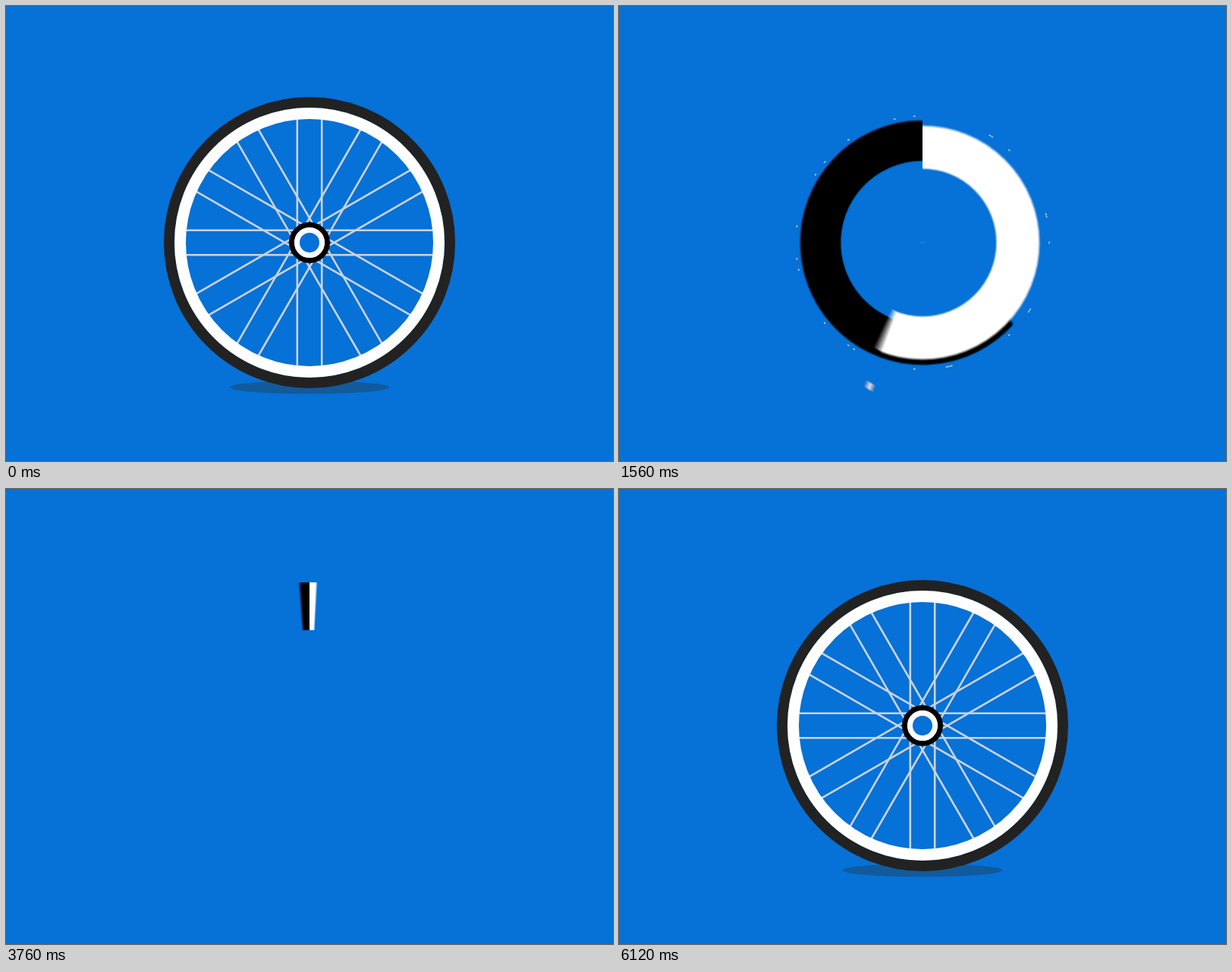
Write an HTML page with a canvas that moves like this. It is 800 px wide and 600 px high and loops after 6.16 s.

```html
<!DOCTYPE html>
<html lang="en">
<head>
<meta charset="utf-8">
<title>Wheel and chart</title>
<style>
  html, body { margin: 0; width: 100%; height: 100%; overflow: hidden; background: #0671d6; }
  canvas { display: block; width: 800px; height: 600px; }
</style>
</head>
<body>
<canvas id="stage" width="800" height="600"></canvas>
<script>
const LOOP = 6160, STEP = 40, SHUTTER = 20, SAMPLES = 12;
const CX = 400, CY = 312, TAU = Math.PI * 2, SHARE = 0.42;
const BLUE = '#0671d6', TIRE = '#222', SPOKE = '#ccd3dc', TICK = '#fddfdb';

const view = document.getElementById('stage').getContext('2d');
const layer = document.createElement('canvas');
layer.width = 800;
layer.height = 600;
const c = layer.getContext('2d');

const rad = deg => deg * Math.PI / 180;
const mix = (a, b, p) => a + (b - a) * p;
const part = (t, from, to) => Math.min(1, Math.max(0, (t - from) / (to - from)));
const out = (t, from, to) => 1 - (1 - part(t, from, to)) ** 3;
const inOut = (t, from, to) => {
  const u = part(t, from, to);
  return u < 0.5 ? 4 * u ** 3 : 1 - 4 * (1 - u) ** 3;
};

// Ring sector; angles are turns clockwise from the top.
function ring(outer, inner, color, from = 0, to = 1) {
  if (outer - inner < 0.05 || to - from < 0.0001) return;
  c.strokeStyle = color;
  c.lineWidth = outer - inner;
  c.beginPath();
  c.arc(0, 0, (outer + inner) / 2, (from - 0.25) * TAU, (to - 0.25) * TAU);
  c.stroke();
}

function shadow(scale) {
  if (scale < 0.005) return;
  c.fillStyle = '#115a9c';
  c.beginPath();
  c.ellipse(0, 190.8, 105 * scale, 8.7 * scale, 0, 0, TAU);
  c.fill();
}

// Twelve spokes fanned from a base angle, set off to one side of the hub.
function fan(base, gap, side, near, far) {
  if (far - near < 0.5) return;
  c.strokeStyle = SPOKE;
  c.lineWidth = 2.6;
  for (let k = 0; k < 12; k++) {
    c.save();
    c.rotate(rad(base - gap * k));
    c.beginPath();
    c.moveTo(near, side * 16.2);
    c.lineTo(far, side * 16.2);
    c.stroke();
    c.restore();
  }
}

function tick(deg, near, far) {
  if (far - near < 0.3) return;
  c.save();
  c.rotate(rad(deg));
  c.fillStyle = TICK;
  c.fillRect(-3.7, -far, 7.4, far - near);
  c.restore();
}

function label(scale, count) {
  if (scale < 0.01) return;
  c.save();
  c.scale(scale, scale);
  c.fillStyle = '#fff';
  c.textAlign = 'center';
  c.font = '800 68px Inter, Lato, sans-serif';
  c.fillText(Math.round(count), -32.5, 23.5);
  c.font = '600 68px Inter, Lato, sans-serif';
  c.fillText('%', 44, 23.5);
  c.restore();
}

function wheelToChart(t) {
  shadow(1 - inOut(t, 480, 1040) + inOut(t, 1500, 2040));

  const p = inOut(t, 484, 1724);
  const near = mix(-4, 167, p);
  fan(90 - 19 * p, 30 + 15 * p, 1, near, 167);
  fan(270 - 30.5 * p, 30 + 17 * p, -1, near, 167);

  const rim = mix(178, 191.5, inOut(t, 454, 1300));
  const edge = mix(192, 191.5, inOut(t, 454, 1300));
  if (t < 1300) {
    ring(edge, rim, TIRE);
    ring(rim, mix(163, 191.5, inOut(t, 750, 1300)), '#fff');
  }

  const grow = inOut(t, 484, 2140);
  ring(mix(27, 189, grow), mix(20, 126, grow), '#000', SHARE * inOut(t, 312, 2140), 1);
  ring(mix(20, 189, inOut(t, 583, 2140)), mix(13, 126, inOut(t, 685, 2140)), '#fff',
    0, mix(1, SHARE, inOut(t, 672, 2140)));

  const orbit = inOut(t, 900, 1900);
  const size = 4.5 * part(t, 1000, 1060) * (1 - part(t, 1700, 1900));
  const r = mix(48, 217, inOut(t, 700, 1900));
  tick(mix(271, 187, orbit), r - size, r + size);

  label(out(t, 1560, 2040), 100 * SHARE * out(t, 1560, 2160));
}

function chartAway(t) {
  const left = 1 - inOut(t, 2770, 3960);
  shadow(1 - inOut(t, 3200, 3720));
  ring(189, 126, '#000', 1 - (1 - SHARE) * left, 1);
  ring(189, 126, '#fff', 0, SHARE * left);
  label(1 - inOut(t, 2800, 3360), 100 * SHARE);
}

function wheelIn(t) {
  shadow(inOut(t, 4480, 4810));

  const rest = 1 - out(t, 4863, 6120);
  const far = mix(0, 167, out(t, 4863, 5655));
  if (t > 4863) {
    fan(90 - 18.6 * rest, 30 - 15 * rest, 1, -4, far);
    fan(270 - 19.8 * rest, 30 - 12.7 * rest, -1, -4, far);
  }

  ring(192 * out(t, 4320, 4848), 178 * out(t, 4350, 4950), TIRE);
  ring(178 * out(t, 4590, 5210), 163 * out(t, 4650, 5410), '#fff');
  ring(27, 20, '#000', 0, inOut(t, 4960, 5610));
  ring(20, 13, '#fff', 0, inOut(t, 5240, 5840));

  const tip = mix(196, 277, out(t, 4960, 5240));
  const tail = mix(196, 277, out(t, 5130, 5440));
  for (let k = 0; k < 9; k++) tick(40 * k, tail, tip);
}

function scene(t) {
  c.setTransform(1, 0, 0, 1, 0, 0);
  c.fillStyle = BLUE;
  c.fillRect(0, 0, 800, 600);
  c.translate(CX, CY);
  if (t < 2400) wheelToChart(t);
  else if (t < 4200) chartAway(t);
  else wheelIn(t);
}

// Average several moments of the open shutter for motion blur.
function render(t) {
  for (let i = 0; i < SAMPLES; i++) {
    scene(t + SHUTTER * ((i + 0.5) / SAMPLES - 0.5));
    view.globalAlpha = 1 / (i + 1);
    view.drawImage(layer, 0, 0);
  }
}

let shown = -1;
const start = performance.now();
function tickFrame() {
  const t = Math.floor(((performance.now() - start) % LOOP) / STEP) * STEP;
  if (t !== shown) render(shown = t);
  requestAnimationFrame(tickFrame);
}
tickFrame();
</script>
</body>
</html>
```
